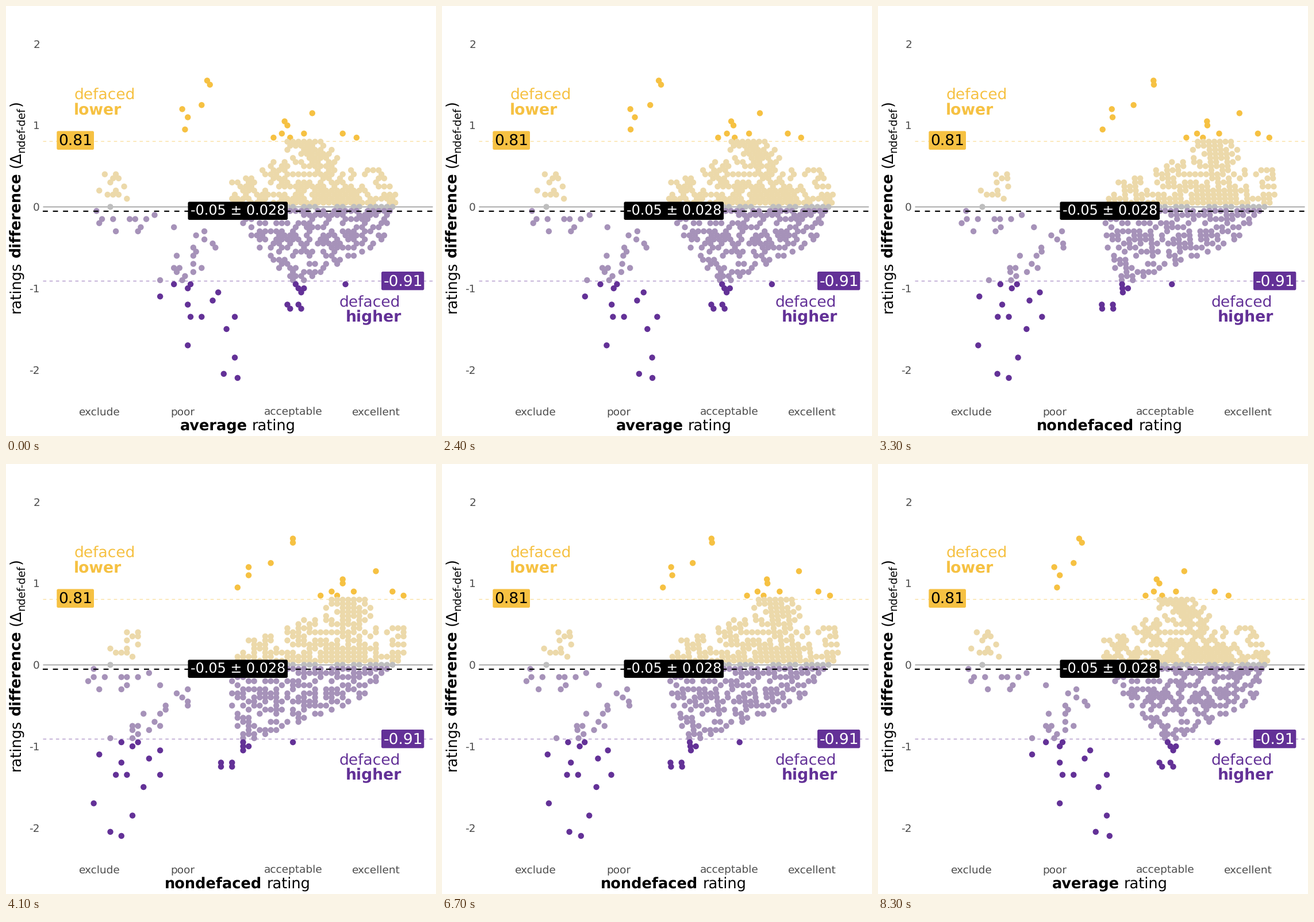
A matplotlib script that plays this animation: 748 px wide and 748 px high, repeating every 10000 ms.

```python
import matplotlib.pyplot as plt
import numpy as np
from matplotlib.animation import FuncAnimation
from matplotlib.patches import FancyBboxPatch

plt.rcParams.update({"font.family": "DejaVu Sans", "text.hinting": "none",
                     "toolbar": "None"})

SIZE, DPI = 748, 68
PT = 72 / DPI                    # points per pixel
X0, DX = 306.6, 9.625            # x of "poor", one rating step of 0.05
Y0, DY = 349.4, 7.085            # y of zero, one difference step of 0.05
YELLOW, PALE_YELLOW = "#f6c142", "#ecd9aa"
PURPLE, PALE_PURPLE = "#633197", "#a692b9"
GREY, TICK = "#bebebe", "#4d4d4d"

fig = plt.figure(figsize=(SIZE / DPI, SIZE / DPI), dpi=DPI, facecolor="white")
ax = fig.add_axes([0, 0, 1, 1])
ax.set(xlim=(0, SIZE), ylim=(SIZE, 0))
ax.axis("off")

# Bright outliers as (nondefaced rating, difference) steps
ABOVE = [(20, 31), (20, 30), (16, 25), (12, 24), (12, 22), (10, 19), (35, 23),
         (29, 21), (29, 20), (27, 18), (31, 18), (38, 18), (25, 17), (28, 17),
         (40, 17)]
BELOW = [(-11, -19), (-8, -19), (-9, -20), (-4, -21), (-15, -22), (-6, -23),
         (-11, -24), (-12, -27), (-10, -27), (-4, -27), (-7, -30), (-16, -34),
         (-9, -37), (-13, -41), (-11, -42), (20, -19), (12, -20)]


def cloud(rng, n, center, spread, low, high, slope=0):
    """Loose points around a line that leans with the difference."""
    j = rng.integers(low, high + 1, n)
    c = center + slope * j + rng.uniform(-spread, spread, n)
    return zip(np.rint(c).astype(int), j)


def crowd(rng):
    """The large cluster: an outline filled more densely near zero."""
    for j in range(-18, 17):
        lo = np.interp(j, [-18, -13, -1, 6, 8, 12, 16],
                       [11, 9, 9, 11, 16, 24, 27])
        hi = np.interp(j, [-18, -13, -9, -4, 0, 3, 9, 10],
                       [13, 23, 31, 35, 38, 40, 40, 34])
        for c in range(round(lo), round(hi) + 1):
            fill = .5 + .4 * np.exp(-(j / 2.6) ** 2)
            if j > 0:
                fill += .3 * np.exp(-((c - 30) / 4) ** 2)
                fill -= .35 * np.exp(-((c - 36) / 1.5) ** 2) * (j > 3)
            if rng.random() < (fill if j else .6):
                yield c, j


def make_points():
    rng = np.random.default_rng(12)
    pts = set(ABOVE + BELOW)
    pts.update((c, j) for c in (7, 9) for j in (-24, -25))
    pts.update((11, j) for j in (-19, -20, -21))
    pts.update(crowd(rng))
    pts.update(cloud(rng, 16, -12, 3, 0, 8, .4))
    pts.update(cloud(rng, 12, -10, 7, -6, -1))
    pts.update(cloud(rng, 20, 8, 3, -18, -6, 1))
    return np.array(sorted(pts, key=lambda p: (-p[1], p[0])))


def dot_color(j):
    if j == 0:
        return GREY
    if j > 0:
        return YELLOW if j > 16 else PALE_YELLOW
    return PURPLE if j < -18 else PALE_PURPLE


def text(x, y, s, px, color="black", ha="left", weight="normal", **kw):
    return ax.text(x, y, s, fontsize=px * PT, color=color, ha=ha,
                   va="baseline", weight=weight, zorder=6, **kw)


def hline(y, color, width, dash="-", z=1):
    ax.plot([64, 742], [y, y], color=color, lw=width * PT, ls=dash,
            dash_capstyle="butt", solid_capstyle="butt", zorder=z)


def tag(x0, y0, x1, y1, fill, label, px, base, color):
    ax.add_patch(FancyBboxPatch((x0, y0), x1 - x0, y1 - y0, fc=fill, lw=0,
                                boxstyle="round,pad=0,rounding_size=2.5",
                                zorder=5))
    text((x0 + x1) / 2 + .5, base, label, px, color, "center")


# Reference lines
DASH = (0, (4, 4))
hline(Y0, "#8c8c8c", 1.4)
hline(234.7, "#fae0a0", 1.4, DASH)
hline(478.4, "#b198cb", 1.4, DASH)
hline(356.5, "black", 2.2, DASH, z=4)

# Axes
for n in range(-2, 3):
    text(59, Y0 - 20 * n * DY + 6.7, str(n), 18.5, TICK, "right")
for name, c in (("exclude", -15), ("poor", 0), ("acceptable", 20),
                ("excellent", 35)):
    text(X0 + c * DX + .7, 711.7, name, 18.5, TICK, "center")


def y_title(y, s, px=25.6, x=25.5, weight="normal"):
    text(x, y, s, px, weight=weight, rotation=90, rotation_mode="anchor")


y_title(534, "ratings")
y_title(437, "difference", weight="bold")
y_title(281, "(Δ")
y_title(254.5, "ndef-def", 19, 32)
y_title(173.5, ")")


def x_title(word, x0, x1):
    return [text(x0, 738.3, word, 25.6, weight="bold"),
            text(x1, 738.3, "rating", 25.6, ha="right")]


avg_title = x_title("average", 302.6, 503.6)
ndef_title = x_title("nondefaced", 276, 529.6)

# Annotations
text(118.3, 163, "defaced", 26.5, YELLOW)
text(118, 188.5, "lower", 26.6, YELLOW, weight="bold")
text(580, 524, "defaced", 26.5, PURPLE)
text(591.2, 549.5, "higher", 26.6, PURPLE, weight="bold")
tag(88.3, 217.5, 153, 250, YELLOW, "0.81", 26.5, 242, "black")
tag(653, 462, 727.3, 494.3, PURPLE, "-0.91", 26.5, 486.5, "white")
tag(316.5, 340.5, 490, 372, "black", "-0.05 ± 0.028", 23.9, 364, "white")

# Points
col, step = make_points().T
ys = Y0 - step * DY
dots = ax.scatter(X0 + col * DX, ys, s=(10.4 * PT) ** 2, linewidths=0,
                  c=[dot_color(j) for j in step], zorder=3)


def cubic(p):
    p = min(max(p, 0), 1)
    return 4 * p ** 3 if p < .5 else 1 - 4 * (1 - p) ** 3


def update(i):
    there, back = (i - 14) / 28, (i - 57) / 27
    mix = cubic(there) - cubic(back)       # 0 average, 1 nondefaced
    dots.set_offsets(np.column_stack(
        (X0 + (col - step / 2 * (1 - mix)) * DX, ys)))
    nondefaced = there >= .5 and back < .5
    for t in avg_title:
        t.set_visible(not nondefaced)
    for t in ndef_title:
        t.set_visible(nondefaced)
    return [dots, *avg_title, *ndef_title]


anim = FuncAnimation(fig, update, frames=100, interval=100, repeat=True,
                     repeat_delay=0, init_func=lambda: update(0))
plt.show()
```
